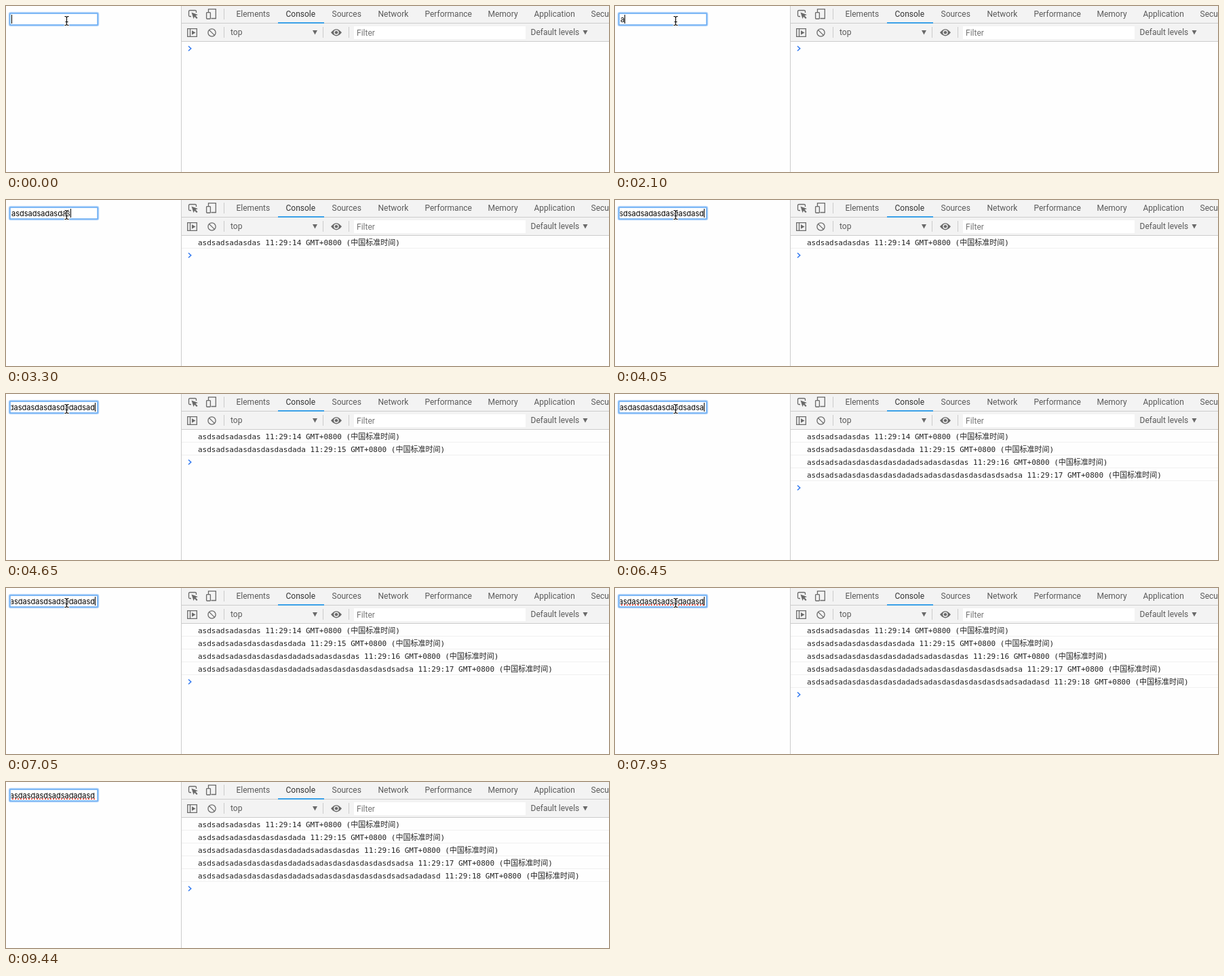
An HTML page that plays this animation: 889 px wide and 246 px high, repeating every 9890 ms.

```html
<!DOCTYPE html>
<html lang="en">
<head>
<meta charset="utf-8">
<title>Throttled input</title>
<style>
  html, body { margin: 0; width: 100%; height: 100%; overflow: hidden; background: #fefefe; }
  svg { display: block; }
  text { white-space: pre; }
  .ui { font: 12px Roboto, sans-serif; fill: #5a5a5a; }
  .log { font: 11px "DejaVu Sans Mono", "Noto Sans CJK SC", "Noto Sans CJK", monospace; fill: #222; }
  .field { font: 11px Inter, sans-serif; fill: #000; }
  .icon { fill: none; stroke: #6a6a6a; stroke-width: 1.3; }
  .solid { fill: #6a6a6a; }
  .rule { fill: #ccc; }
</style>
</head>
<body>
<svg width="889" height="246" viewBox="0 0 889 246">
  <defs><clipPath id="inner"><rect x="7.5" y="11" width="125" height="17"/></clipPath></defs>
  <rect width="889" height="246" fill="#fefefe"/>

  <!-- focused input -->
  <rect x="4.5" y="9.5" width="132" height="20" rx="2.5" fill="none" stroke="#b9d8fa" stroke-width="1.6"/>
  <rect x="5.8" y="10.8" width="129.4" height="17.4" rx="1" fill="#fff" stroke="#70b0f4" stroke-width="1.8"/>
  <g clip-path="url(#inner)">
    <text id="field" class="field" x="8" y="24"></text>
    <path id="spelling" d="M9 25.2H131" stroke="#e8443a" stroke-width="1.7" stroke-dasharray="2 2"/>
  </g>
  <rect id="caret" y="13" width="1" height="13"/>

  <!-- panel toolbars -->
  <rect x="259" width="630" height="52" fill="#f3f3f3"/>
  <rect class="rule" x="258" width="1" height="246"/>
  <rect class="rule" x="259" y="25" width="630" height="1"/>
  <rect class="rule" x="259" y="52" width="630" height="1"/>
  <rect x="401" y="24" width="68" height="2" fill="#3aa0e8"/>
  <g id="tabs" class="ui"></g>
  <path d="M321.5 4V20M321.5 31V47M467.5 31V47M505.5 31V47" stroke="#ccc"/>

  <path class="icon" d="M273 15.5H271Q269.5 15.5 269.5 14V8Q269.5 6.5 271 6.5H279Q280.500 6.500 280.500 8V10"/>
  <path class="solid" d="M273.500 9.500L283 13L279.500 14.300L282.500 17.500L281 19L278 15.800L276.500 19Z"/>
  <path class="icon" d="M298.500 9V4.700H309.300V18.500H302.500"/>
  <rect class="icon" x="295.600" y="9.600" width="5.800" height="9.400" rx=".8"/>

  <path class="icon" d="M267.700 33.700H281.300V45.300H267.700ZM271.500 33.500V45.500"/>
  <path class="solid" d="M274 36.300L279.500 39.500L274 42.700Z"/>
  <circle class="icon" cx="303.500" cy="39.500" r="5.600" stroke-width="1.600"/>
  <path class="icon" d="M299.600 35.600L307.400 43.400" stroke-width="1.600"/>
  <text class="ui" x="331" y="43">top</text>
  <path class="solid" d="M452 36H459L455.500 42.500ZM850.500 36H857.500L854 42.500Z"/>
  <path class="solid" d="M479 39.300Q487 29 495 39.300Q487 49.600 479 39.300Z"/>
  <circle cx="487" cy="39.300" r="3.700" fill="#f3f3f3"/>
  <circle class="solid" cx="487" cy="39.300" r="2.300"/>
  <rect x="513" y="30" width="253" height="19" fill="#fff"/>
  <text class="ui" x="517" y="44" style="fill:#757575">Filter</text>
  <text class="ui" x="773.500" y="43">Default levels</text>

  <!-- console output -->
  <g id="logs"></g>
  <path id="prompt" d="M269 59.500L272.700 63L269 66.500" fill="none" stroke="#367cf1" stroke-width="1.600"/>

  <!-- mouse pointers, drawn around their hot spot -->
  <g id="beam" fill="none" stroke-linecap="square">
    <path id="beamShape" d="M-2.500 -6.500H-1.500L0 -5.500L1.500 -6.500H2.500M0 -5.500V5.500M-2.500 6.500H-1.500L0 5.500L1.500 6.500H2.500M-1.500 1.500H1.500" stroke="#fff" stroke-width="2.400"/>
    <use href="#beamShape" style="stroke:#000"/>
    <path d="M-2.500 -6.500H-1.500L0 -5.500L1.500 -6.500H2.500M0 -5.500V5.500M-2.500 6.500H-1.500L0 5.500L1.500 6.500H2.500M-1.500 1.500H1.500" stroke="#000" stroke-width="1.100"/>
  </g>
  <path id="arrow" d="M0 0V14.500L3.300 11.400L5.700 16.800L8 15.800L5.700 10.500H10.300Z" stroke="#fff"/>
</svg>
<script>
const LOOP = 9890, TICK = 150, LAST = 9440, ROW = 19;
const TYPED = 'asdsadsadasdasdasdasdadadsadasdasdasdasdasdsadsadadasd';

// [time, characters typed]
const TYPING = [[1950, 0], [2100, 1], [2250, 3], [2400, 3], [3150, 12], [3300, 14], [4350, 24],
  [4650, 28], [5400, 36], [5550, 37], [6450, 48], [7050, 54]];
// [time, characters logged, clock second]
const LOGS = [[3300, 14, 14], [4350, 24, 15], [5400, 36, 16], [6450, 48, 17], [7500, 54, 18]];
const CARET_OFF = [[150, 600], [1200, 1650], [7500, 7950], [8400, 9000], [LAST, LOOP]];
const TABS = [['Elements', 339.5], ['Console', 412.5], ['Sources', 480.5], ['Network', 548.5],
  ['Performance', 617.5], ['Memory', 710.5], ['Application', 778.5], ['Security', 862.5]];

const $ = id => document.getElementById(id);
const show = (el, on) => { el.style.display = on ? '' : 'none'; };
const move = (el, x, y) => el.setAttribute('transform', `translate(${x} ${y})`);

function add(parent, tag, attrs, text = '') {
  const el = document.createElementNS('http://www.w3.org/2000/svg', tag);
  for (const key in attrs) el.setAttribute(key, attrs[key]);
  el.textContent = text;
  return parent.appendChild(el);
}

for (const [name, x] of TABS) {
  add($('tabs'), 'text', { x, y: 16, style: name === 'Console' ? 'fill:#333' : '' }, name);
}

const rows = LOGS.map(([, count, second], i) => {
  const row = add($('logs'), 'g', {});
  add(row, 'text', { class: 'log', x: 283, y: 67 + i * ROW },
    `${TYPED.slice(0, count)} 11:29:${second} GMT+0800 (中国标准时间)`);
  add(row, 'rect', { x: 259, y: 71 + i * ROW, width: 630, height: 1, fill: '#f0f0f0' });
  return row;
});

function typedCount(t) {
  const next = TYPING.findIndex(([time]) => time > t);
  if (next === 0) return 0;
  if (next < 0) return TYPED.length;
  const [t0, n0] = TYPING[next - 1], [t1, n1] = TYPING[next];
  return Math.floor(n0 + (n1 - n0) * (t - t0) / (t1 - t0) + 1e-6);
}

function drawField(t) {
  const field = $('field');
  field.textContent = TYPED.slice(0, typedCount(t));
  const width = field.textContent ? field.getComputedTextLength() : 0;
  const scroll = Math.max(0, width - 123);
  field.setAttribute('x', 8 - scroll);
  $('caret').setAttribute('x', Math.round(8 + width - scroll));
  show($('caret'), !CARET_OFF.some(([from, to]) => t >= from && t < to));
  show($('spelling'), t >= 7950);
}

function drawPointer(t) {
  const p = Math.min(1, Math.max(0, (t - 8250) / 1050));
  const ease = p * p * (3 - 2 * p);
  const x = 89.5 + 720 * ease, y = 22 + 212 * ease;
  const overField = x < 137 && y < 30;
  move($('beam'), x, y);
  move($('arrow'), x, y);
  show($('beam'), overField && t < LAST);
  show($('arrow'), !overField && t < LAST);
}

function draw(time) {
  const t = time >= LAST ? LAST : Math.floor(time / TICK) * TICK;
  drawField(t);
  drawPointer(t);
  rows.forEach((row, i) => show(row, t >= LOGS[i][0]));
  move($('prompt'), 0, ROW * LOGS.filter(([at]) => t >= at).length);
}

const start = performance.now();
function frame() {
  draw((performance.now() - start) % LOOP);
  requestAnimationFrame(frame);
}
frame();
</script>
</body>
</html>
```
